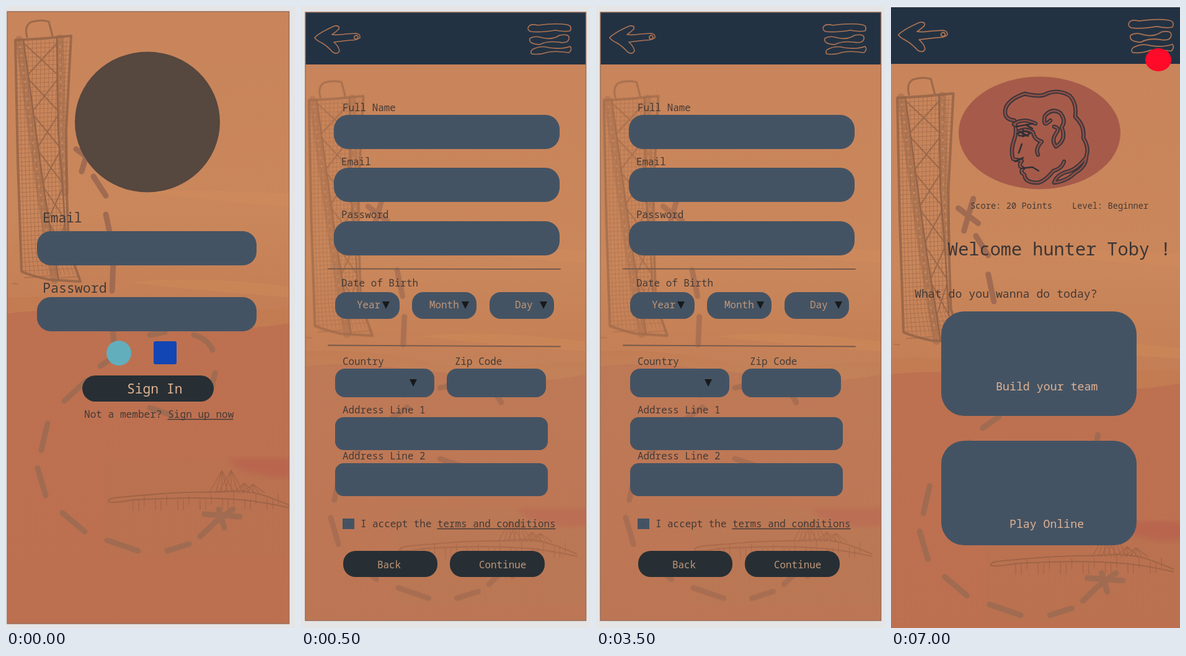
An HTML page that plays this animation: 466 by 1000 pixels, repeating every 8000 ms.

```html
<!DOCTYPE html>
<html lang="en">
<head>
<meta charset="utf-8">
<title>Treasure hunt app</title>
<style>
html, body { margin: 0; width: 100%; height: 100%; overflow: hidden; background: #e5e5e5; }
svg { display: block; width: 100%; height: 100%; }
text { font-family: "Noto Sans Mono", "DejaVu Sans Mono", monospace; font-weight: 500; white-space: pre; }
.line { fill: none; stroke-linecap: round; stroke-linejoin: round; }
</style>
</head>
<body>
<svg id="stage" viewBox="0 0 466 1000" preserveAspectRatio="none"></svg>
<script>
const SLATE = '#445363', DARK = '#272f34', NAVY = '#233243', TEXT = '#433a37', INK = '#956448';

const box = (x, y, w, h, r, fill = SLATE) =>
  `<rect x="${x}" y="${y}" width="${w}" height="${h}" rx="${r}" fill="${fill}"/>`;
const oval = (x, y, rx, ry, fill) =>
  `<ellipse cx="${x}" cy="${y}" rx="${rx}" ry="${ry}" fill="${fill}"/>`;
const line = (d, color, width, extra = '') =>
  `<path class="line" d="${d}" stroke="${color}" stroke-width="${width}" ${extra}/>`;
const label = (x, y, size, str, fill = TEXT) =>
  `<text x="${x}" y="${y}" font-size="${size}" fill="${fill}">${str}</text>`;
const arrowDown = (x, y) => `<path d="M${x} ${y}h12l-6 12z" fill="#17191b"/>`;
const place = (id, t, extra = '') => `<use href="#${id}" transform="${t}" ${extra}/>`;
const lerp = (a, b, t) => a + (b - a) * t;

// Piecewise linear x for a height y along a list of [x, y] points
function along(points, y) {
  let i = 1;
  while (i < points.length - 1 && points[i][1] < y) i++;
  const [ax, ay] = points[i - 1], [bx, by] = points[i];
  return lerp(ax, bx, (y - ay) / (by - ay));
}

function tower() {
  const left = [[15, 55], [19, 250], [25, 427]];
  const right = [[105, 48], [97, 200], [98, 300], [101, 390], [120, 443]];
  const fold = [[28, 54], [48, 200], [62, 300], [85, 441]];
  const strip = [[82, 50], [84, 200], [92, 300], [98, 400]];
  const path = pts => 'M' + pts.map(p => p.join(' ')).join('L');
  let mesh = '', dots = '', beams = '';
  for (let y = 62; y < 430; y += 7)
    mesh += `M${along(left, y)} ${y}L${along(right, y)} ${y - 4}`;
  for (let k = 1; k < 13; k++) {
    const pts = [];
    for (let y = 54; y <= 432; y += 42) pts.push([lerp(along(left, y), along(right, y), k / 13), y]);
    mesh += path(pts);
  }
  for (let y = 66; y < 425; y += 14) {
    dots += oval(along(fold, y) - 7, y, 1.7, 1.7, '#c78860');
    if (y < 300) dots += oval(along(strip, y) + 5, y, 1.7, 1.7, '#c78860');
  }
  for (let y = 60; y < 380; y += 58) {
    const l = along(fold, y), r = along(strip, y);
    beams += `M${l} ${y}L${along(strip, y + 50)} ${y + 50}M${r} ${y}L${along(fold, y + 50)} ${y + 50}`;
  }
  return line(mesh, INK, .9, 'opacity=".6"') +
    line(path(fold.map(([x, y]) => [x - 7, y])), INK, 12, 'opacity=".45"') +
    line('M87 52L90 200L95 300', INK, 13, 'opacity=".4"') +
    line(beams, INK, 2, 'opacity=".85"') +
    line(path(fold) + path(strip), INK, 2.5) + dots +
    line('M34 50Q29 33 40 26Q55 21 69 25L75 48', INK, 3, 'opacity=".85"') +
    line(path(left) + 'Q45 435 70 440L120 443M15 55Q60 53 105 48' + path(right), INK, 4, 'opacity=".85"') +
    line('M30 437l40 -3M88 437l30 -2M10 446l9 1', INK, 2, 'opacity=".5"');
}

function bridge() {
  let piers = '', cables = '';
  for (let i = 0; i < 14; i++) {
    const x = 205 + i * 18;
    piers += `M${x} ${794 - i * .2}v${i % 2 ? 9 : 17}m${i % 2 ? 0 : 9} 0v-16`;
  }
  for (const [x, top, span] of [[348, 747, 20], [363, 746, 21], [384, 767, 18], [398, 769, 19]])
    for (const k of [-1, -.5, 0, .5, 1]) cables += `M${x} ${top}L${x + k * span} 783`;
  return line('M165 797C164 789 185 790 240 785S325 783 360 780S425 789 458 803' +
    'M165 797Q172 800 205 794Q310 788 380 794Q420 798 458 807', '#985f45', 1.8, 'opacity=".8"') +
    line(piers, '#985f45', 1.2, 'opacity=".65"') + line(cables, '#985f45', 1.1, 'opacity=".75"');
}

const trail = 'M113 230L145 254M137 215L122 266M141 274L161 305M161 335L170 378M173 412L171 458' +
  'M172 520L174 541M232 529L256 524M303 529Q325 535 333 553M337 590L332 612M232 646L265 657' +
  'M178 561L152 579M130 602L94 635M67 671L57 714M51 743L64 787M91 815L127 845M163 859L213 876' +
  'M260 876L295 865M313 853L333 834M320 817L377 821M366 809L336 831M343 809L352 839';

const sky = `<rect x="-20" y="-110" width="510" height="630" fill="url(#upper)"/>
  <path d="M-20 497Q60 484 150 494T330 514T490 500V1020H-20Z" fill="url(#lower)"/>
  <path d="M-20 470Q90 462 190 482T350 494T490 486V505Q380 525 270 508T90 489T-20 497Z" fill="#c37b52" opacity=".8"/>
  <path d="M200 444Q330 432 490 456V470Q350 462 200 444Z" fill="#cf8d58" opacity=".4"/>
  <path d="M215 298Q340 294 490 304V325Q350 316 215 298Z" fill="#d08c5a" opacity=".4"/>
  <rect x="160" y="727" width="330" height="160" fill="#b97450" opacity=".55"/>
  <path d="M360 727H490V752Q450 765 410 752Q370 748 360 727Z" fill="#b95b4d" opacity=".55" filter="url(#soft)"/>`;

const backIcon = 'M22 51C29 43 43 37 54 32Q63 31 61 37Q56 42 50 46Q61 47 72 45L89 44Q96 45 95 51Q91 55 79 55' +
  'L53 58Q61 65 62 72Q59 79 51 74Q42 64 33 59Q26 56 22 51ZM86 49a3 3 0 1 0 5 -1q-2 -2 -5 1';
const menuIcon = 'M367 33Q371 28 382 31Q410 27 429 30Q438 32 434 40Q425 42 410 39Q385 43 370 41Q364 38 367 33Z' +
  'M369 52Q377 47 389 51Q405 55 417 47Q434 44 432 53Q430 61 415 58Q396 56 385 62Q366 61 369 52Z' +
  'M373 70Q386 63 400 67Q420 70 434 65Q438 70 432 75Q413 72 399 74Q384 79 372 77Q369 74 373 70Z';

function portrait() {
  const hair = 'M199 184Q180 182 185 164Q191 149 216 141Q235 146 247 143Q267 132 288 144Q300 156 297 178' +
    'Q313 193 310 212Q320 228 315 241Q315 258 297 268Q283 282 263 284';
  const face = 'M200 189Q203 203 199 214Q192 233 197 246L211 249Q204 257 213 261Q207 267 215 271' +
    'Q216 285 238 284Q250 280 262 265Q276 261 279 250';
  const ear = 'M257 184Q244 197 248 177Q259 163 273 172Q283 185 275 195Q284 215 266 226Q258 217 266 205Q273 196 263 194';
  const brow = 'M198 190Q213 179 233 189M203 204Q215 194 229 203Q231 215 243 218Q232 230 237 239';
  const neck = 'M263 284Q268 270 286 266Q300 262 315 243';
  const all = hair + face + ear + brow + neck;
  return line(all, '#3b353b', 6.6) + line(all, '#8f5046', 2.6) +
    line('M203 205Q216 198 224 205Q215 211 206 208M207 202l14 7M213 199v11M201 194l28 -5M200 250l13 -6' +
      'M211 261l17 -2l10 6M219 192l9 5M211 222l-5 14', '#332f37', 2.6);
}

const defs = `<defs>
  <linearGradient id="upper" x1="0" y1="0" x2="0" y2="1"><stop offset="0" stop-color="#c8835a"/>
    <stop offset=".7" stop-color="#ca875b"/><stop offset="1" stop-color="#c37c54"/></linearGradient>
  <linearGradient id="lower" x1="0" y1="0" x2="0" y2="1"><stop offset="0" stop-color="#bd7150"/>
    <stop offset="1" stop-color="#bc7050"/></linearGradient>
  <linearGradient id="haze" x1="0" y1="0" x2="0" y2="1"><stop offset="0" stop-color="#c09068" stop-opacity="0"/>
    <stop offset=".1" stop-color="#c09068" stop-opacity=".27"/>
    <stop offset="1" stop-color="#c09068" stop-opacity=".18"/></linearGradient>
  <filter id="soft"><feGaussianBlur stdDeviation="4"/></filter>
  <clipPath id="pageA"><rect x="2" y="9" width="455" height="984"/></clipPath>
  <clipPath id="pageB"><rect x="7" y="10" width="453" height="978"/></clipPath>
  <clipPath id="pageC"><rect y="2" width="466" height="998"/></clipPath>
  <g id="sky">${sky}</g>
  <g id="ink">${tower()}${bridge()}${line(trail, '#a06b51', 9)}</g>
  <g id="back">${line(backIcon, '#ad7353', 1.6)}</g>
  <g id="menu">${line(menuIcon, '#ad7353', 1.6)}</g>
</defs>`;

const backdrop = (clip, t, opacity, haze = '') =>
  `<g clip-path="url(#${clip})">${place('sky', t)}${haze}${place('ink', t, `opacity="${opacity}"`)}</g>`;
const frame = (x, y, w, h) =>
  `<rect x="${x}" y="${y}" width="${w}" height="${h}" fill="none" stroke="#9b6f5b" stroke-width="1.5"/>`;

const signIn = () => backdrop('pageA', 'translate(0 0)', 1) + frame(2, 9, 454.5, 984) +
  oval(228, 186.5, 117, 113, '#56473f') +
  label(59, 348, 21.2, 'Email') + box(50, 362, 354, 55, 22) +
  label(59, 461, 21.6, 'Password') + box(50, 468, 354, 55, 22) +
  oval(182, 558, 20, 20, '#62aebd') + box(238, 539, 37, 37, 3, '#1246b4') +
  box(123, 594, 212, 42, 21, DARK) + label(195, 623, 21.3, 'Sign In', '#dfb293') +
  label(126, 662, 16.1, 'Not a member? Sign up now') + line('M261 664.5H366', TEXT, 1.3);

const register = () => {
  const t = 'translate(-2 98) scale(.975)', tan = '#c1977a';
  const note = (x, y, s, fill) => label(x, y, 15.9, s, fill);
  let out = backdrop('pageB', t, .72, box(7, 540, 453, 448, 0, 'url(#haze)')) +
    box(7, 10, 453, 84, 0, NAVY) + frame(7, 10, 452.5, 978) +
    place('back', '') + place('menu', '');
  [['Full Name', 67, 169, 175], ['Email', 65, 256, 260], ['Password', 65, 341, 346]]
    .forEach(([s, x, base, y]) => out += note(x, base, s) + box(53, y, 364, 55, 23));
  out += line('M44 422.5L418 423M44 545.5L418 547.5', '#76594b', 1.8) + note(65, 451, 'Date of Birth');
  [['Year', 55, 90, 131], ['Month', 179, 207, 259], ['Day', 304, 345, 385]]
    .forEach(([s, x, tx, ax]) => out += box(x, 460, 104, 43, 18) + note(tx, 486, s, tan) + arrowDown(ax, 475));
  out += note(67, 577, 'Country') + note(248, 577, 'Zip Code') +
    box(55, 583, 160, 46, 16) + box(235, 583, 160, 46, 16) + arrowDown(175, 600) +
    note(67, 655, 'Address Line 1') + box(55, 661, 343, 53, 14) +
    note(67, 729, 'Address Line 2') + box(55, 735, 343, 53, 14) +
    box(67, 824, 19, 17, 0) + note(96, 838, 'I accept the terms and conditions') +
    line('M220 840.5H410', TEXT, 1.3) +
    box(68, 876, 152, 42, 20, DARK) + note(123, 904, 'Back', tan) +
    box(240, 876, 153, 42, 20, DARK) + note(287, 904, 'Continue', tan);
  return out;
};

const home = () => backdrop('pageC', 'translate(-5 92) scale(1.005 1.013)', 1) +
  box(0, 2, 466, 91, 0, NAVY) +
  place('back', 'translate(-12 -8) scale(1.08 1.07)') +
  place('menu', 'translate(2.4 -10) scale(1.04 1.1)') +
  oval(431, 86.5, 21, 18.5, '#ff0a28') +
  oval(239.5, 204, 130.5, 90.5, '#a65b4a') + portrait() +
  label(128, 326, 13.75, 'Score: 20 Points') + label(292, 326, 13.7, 'Level: Beginner') +
  label(91, 401, 28.6, 'Welcome hunter Toby !', '#3b3536') +
  label(38, 469, 18.2, 'What do you wanna do today?') +
  box(81, 491, 315, 168, 37) + label(169, 618, 18.3, 'Build your team', '#dfb293') +
  box(81, 699, 315, 168, 37) + label(191, 839, 18.2, 'Play Online', '#dfb293');

const stage = document.getElementById('stage');
stage.innerHTML = defs + [signIn, register, home].map(s => `<g class="scene">${s()}</g>`).join('');
const scenes = stage.querySelectorAll('.scene');

const LOOP = 8000;
const start = performance.now();

function draw(ms) {
  const active = ms < 500 ? 0 : ms < 5500 ? 1 : 2;
  scenes.forEach((s, i) => { s.style.display = i === active ? '' : 'none'; });
}

function tick() {
  draw((performance.now() - start) % LOOP);
  requestAnimationFrame(tick);
}
tick();
</script>
</body>
</html>
```
